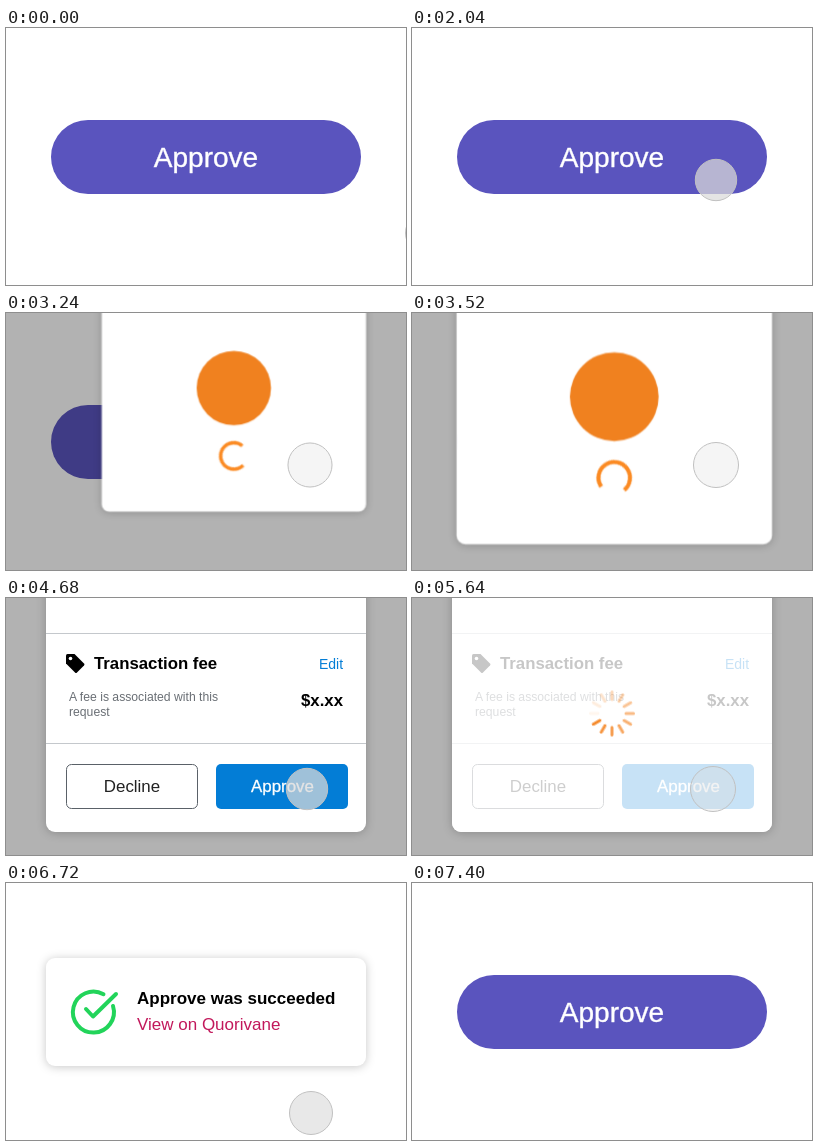
Animation of 400 by 257 pixels, one loop 8000 ms. Source, as an HTML page:

```html
<!DOCTYPE html>
<html lang="en">
<head>
<meta charset="utf-8">
<title>Approve flow</title>
<style>
html, body { margin: 0; width: 100%; height: 100%; overflow: hidden; background: #fff; }
svg { display: block; width: 100vw; height: 100vh; font-family: "Liberation Sans", Arial, sans-serif; }

/* Every part shares one 8 s timeline: 1% = 80 ms. */
.t { animation: 8s linear infinite; --io: cubic-bezier(.65, 0, .35, 1); }

.button { animation-name: button; }
.shade { animation-name: shade; }
.popup { animation-name: popup; transform-origin: 360px 30px; }
.loader { animation-name: loader; animation-timing-function: step-end; }
.request { animation-name: request; animation-timing-function: step-end; }
.ring { animation-name: turn; }
.busy { animation-name: busy; }
.toast { animation-name: toast; }
.pointer { animation-name: move; }
.dot { animation-name: press; stroke: #c0c0c0; stroke-width: 1; }
.spoke { animation: fade 1s linear infinite; }

.panel { fill: #fff; filter: drop-shadow(0 1px 5px rgba(0, 0, 0, .22)); }
.strong { font-weight: bold; }
.mid { text-anchor: middle; }

@keyframes button {
  0%, 55% { opacity: 1; }
  55.01%, 86% { opacity: 0; }
  92.5%, 100% { opacity: 1; }
}
@keyframes shade {
  0%, 28% { opacity: 0; animation-timing-function: cubic-bezier(.6, 0, .25, 1); }
  38.5%, 71% { opacity: .3; }
  76%, 100% { opacity: 0; }
}
@keyframes popup {
  0%, 34.79% { transform: scale(0); opacity: 1; animation-timing-function: var(--io); }
  45.69%, 71% { transform: scale(1); opacity: 1; }
  76%, 100% { transform: scale(1); opacity: 0; }
}
@keyframes loader { 0% { opacity: 1; } 45%, 100% { opacity: 0; } }
@keyframes request { 0% { opacity: 0; } 45%, 100% { opacity: 1; } }
@keyframes turn { to { transform: rotate(8turn); } }
@keyframes busy {
  0%, 60% { opacity: 0; }
  64%, 100% { opacity: 1; }
}
@keyframes fade { from { opacity: 1; } to { opacity: 0; } }
@keyframes toast {
  0%, 71% { opacity: 0; }
  76%, 85.5% { opacity: 1; }
  91%, 100% { opacity: 0; }
}
@keyframes move {
  0%, 6.5% { transform: translate(422px, 205px); animation-timing-function: var(--io); }
  10%, 51% { transform: translate(304px, 152px); animation-timing-function: var(--io); }
  56.5%, 79.5% { transform: translate(301px, 191px); animation-timing-function: var(--io); }
  83%, 85.5% { transform: translate(305px, 230px); animation-timing-function: var(--io); }
  91%, 100% { transform: translate(325px, 285px); }
}
@keyframes press {
  0%, 25.49% { r: 22.5px; fill: rgba(220, 220, 220, .3); }
  25.5%, 28% { r: 20.7px; fill: rgba(218, 218, 218, .73); }
  36.5% { r: 21.5px; fill: rgba(220, 220, 220, .3); }
  44%, 58.49% { r: 22.5px; fill: rgba(220, 220, 220, .3); }
  58.5%, 60% { r: 20.7px; fill: rgba(218, 218, 218, .73); }
  69%, 83.99% { r: 22.5px; fill: rgba(220, 220, 220, .35); }
  84%, 85.99% { r: 21.5px; fill: rgba(222, 222, 222, .7); }
  90%, 100% { r: 22.5px; fill: rgba(220, 220, 220, .3); }
}
</style>
</head>
<body>
<svg viewBox="0 0 400 257">
  <g class="t button">
    <rect x="45" y="92" width="310" height="74" rx="37" fill="#5a54be"/>
    <text class="mid" x="200" y="139" font-size="28" fill="#fff" stroke="#fff" stroke-width=".4">Approve</text>
  </g>

  <rect class="t shade" width="400" height="257"/>

  <g class="t toast">
    <rect class="panel" x="40" y="75" width="320" height="108" rx="9"/>
    <g fill="none" stroke="#22d45a" stroke-width="4" stroke-linecap="round" stroke-linejoin="round">
      <path d="M107 123A20.5 20.5 0 1 1 97.500 111.200"/>
      <path d="M80 126L87 133.500L110 111"/>
    </g>
    <text class="strong" x="131" y="121" font-size="17">Approve was succeeded</text>
    <text x="131" y="147" font-size="17" fill="#c2185b">View on Quorivane</text>
  </g>

  <g class="t popup">
    <rect class="panel" x="40" y="-100" width="320" height="334" rx="9"/>

    <g class="t loader">
      <circle cx="200" cy="84.500" r="45" fill="#f0811f"/>
      <g transform="translate(200 166.700)">
        <g class="t ring">
          <circle r="16" fill="none" stroke="#fb8a22" stroke-width="4.200" pathLength="360"
            stroke-dasharray="265 95" transform="rotate(-42)"/>
        </g>
      </g>
    </g>

    <g class="t request">
      <path d="M40 35.500H360M40 145.500H360" stroke="#c4c8cc"/>
      <path d="M61.500 56H68.500L78 65.500Q79 66.500 78 67.500L71 74.500Q70 75.500 69 74.500L60 65.500V57.500Q60 56 61.500 56Z"/>
      <circle cx="64.500" cy="60.500" r="1.800" fill="#fff"/>
      <text class="strong" x="88" y="71" font-size="16.800">Transaction fee</text>
      <text x="313" y="71" font-size="14" fill="#037dd6">Edit</text>
      <text class="strong" x="295" y="108" font-size="16.800">$x.xx</text>
      <g font-size="12.200" fill="#6a6f75">
        <text x="63" y="103">A fee is associated with this</text>
        <text x="63" y="118">request</text>
      </g>
      <rect x="60.500" y="166.500" width="131" height="44" rx="5" fill="#fff" stroke="#5a6168"/>
      <rect x="210" y="166" width="132" height="45" rx="5" fill="#037dd6"/>
      <g class="mid" font-size="16.900">
        <text x="126" y="194" fill="#222">Decline</text>
        <text x="276.500" y="194" fill="#fff" stroke="#fff" stroke-width=".3">Approve</text>
      </g>
      <g class="t busy">
        <rect x="40" y="-100" width="320" height="334" rx="9" fill="#fff" fill-opacity=".78"/>
        <g id="spokes" transform="translate(200 115.500)" fill="#f58a2c"></g>
      </g>
    </g>
  </g>

  <g class="t pointer"><circle class="t dot" r="22.500"/></g>
</svg>
<script>
const spokes = document.getElementById("spokes");
const count = 12;
for (let i = 0; i < count; i++) {
  const spoke = document.createElementNS("http://www.w3.org/2000/svg", "rect");
  const box = { x: 12.5, y: -1.5, width: 10.5, height: 3, rx: 1.5, transform: `rotate(${i * 360 / count})` };
  for (const name in box) spoke.setAttribute(name, box[name]);
  spoke.setAttribute("class", "spoke");
  spoke.style.animationDelay = `${i / count + 0.22 - 2}s`;
  spokes.append(spoke);
}
</script>
</body>
</html>
```
